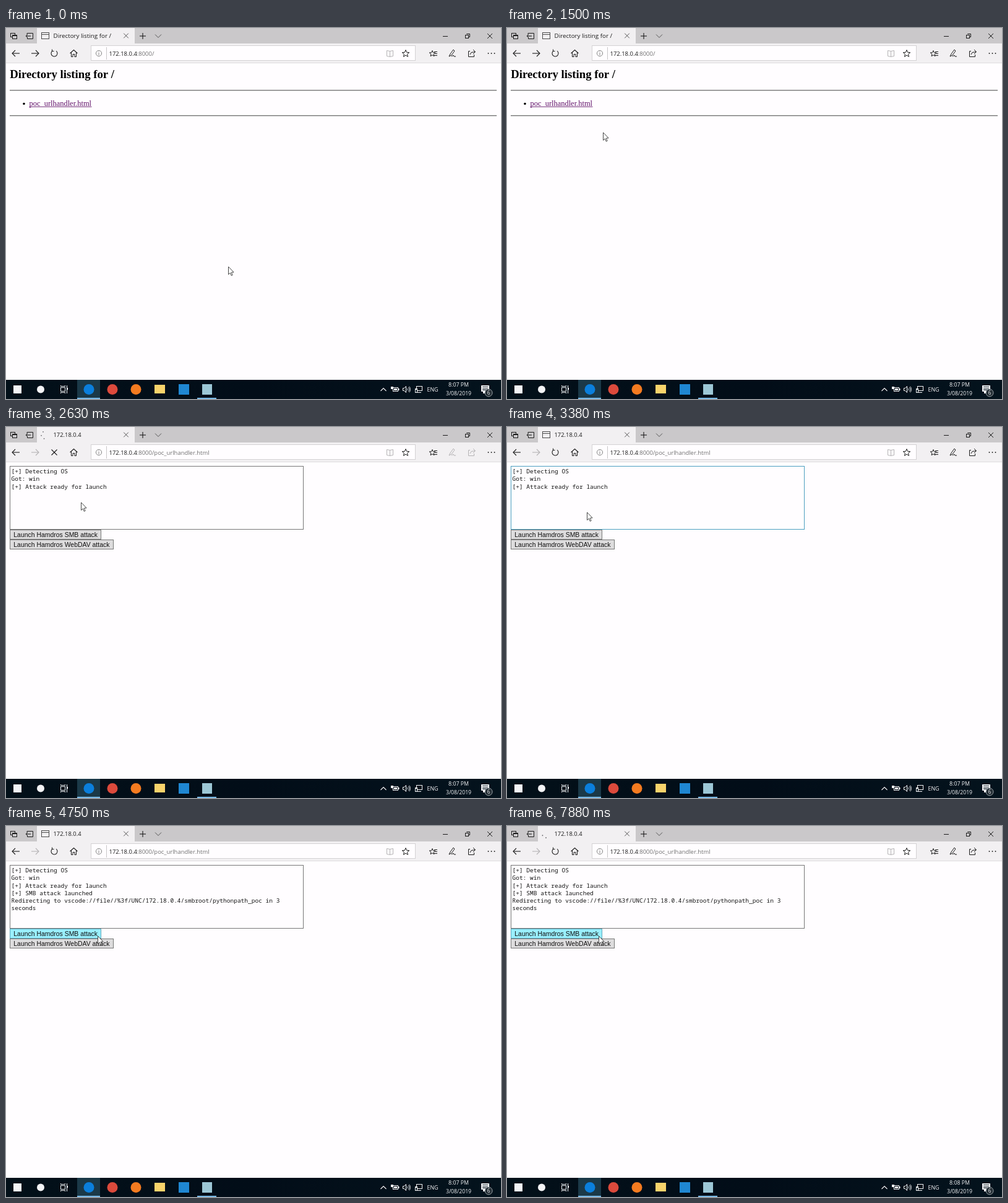
These frames come from a looping animation (800x600 px, 8000 ms). An HTML page with a canvas:

```html
<!DOCTYPE html>
<html lang="en">
<head>
<meta charset="utf-8">
<title>Browser demo</title>
<style>
html, body { margin: 0; width: 100%; height: 100%; overflow: hidden; background: #fffdff; }
canvas { display: block; }
</style>
</head>
<body>
<canvas id="stage" width="800" height="600"></canvas>
<script>
const ctx = document.getElementById('stage').getContext('2d');
const LOOP = 8000, TICK = 125;
const INK = '#1c1c1c', FADED = '#b4b2b4', WHITE = '#f4f4f6';
const UI = '"Open Sans", sans-serif';
const SERIF = '"Liberation Serif", serif';
const SANS = '"Liberation Sans", sans-serif';
const MONO = '"Noto Sans Mono", monospace';

// Times of the events on the screen, in ms.
const LINK_HOVER = 1875, LOAD_START = 2250, PAGE_SHOWN = 2625, LOAD_END = 2875;
const MOVE_IN_BOX = 3250, PRESS = 4625, LAUNCH = 4750, MINUTE = 7250, REDIRECT = 7750;

const linear = p => p;
const smooth = p => p * p * (3 - 2 * p);
const MOVES = [
  { from: 625, to: 1500, a: [359, 386], b: [155, 169], ease: smooth },
  { from: 1500, to: 2000, a: [155, 169], b: [121, 122], ease: linear },
  { from: 3125, to: 4000, a: [121, 122], b: [148, 178], ease: linear }
];

function pointerAt(t) {
  let pos = MOVES[0].a;
  for (const m of MOVES) {
    if (t < m.from) break;
    const p = m.ease(Math.min(1, (t - m.from) / (m.to - m.from)));
    pos = m.a.map((v, i) => Math.round(v + (m.b[i] - v) * p));
  }
  return pos;
}

function box(x, y, w, h, color) {
  ctx.fillStyle = color;
  ctx.fillRect(x, y, w, h);
}

function frame(x, y, w, h, color, width = 1) {
  ctx.strokeStyle = color;
  ctx.lineWidth = width;
  ctx.strokeRect(x + 0.5, y + 0.5, w - 1, h - 1);
}

function path(points, color, width = 1, closed = false) {
  ctx.beginPath();
  for (let i = 0; i < points.length; i += 2) ctx.lineTo(points[i], points[i + 1]);
  if (closed) ctx.closePath();
  ctx.strokeStyle = color;
  ctx.lineWidth = width;
  ctx.stroke();
}

function disc(x, y, r, color) {
  ctx.beginPath();
  ctx.arc(x, y, r, 0, Math.PI * 2);
  ctx.fillStyle = color;
  ctx.fill();
}

function arc(x, y, r, color, start = 0, end = Math.PI * 2, width = 1) {
  ctx.beginPath();
  ctx.arc(x, y, r, start, end);
  ctx.strokeStyle = color;
  ctx.lineWidth = width;
  ctx.stroke();
}

function text(str, x, y, size, family, color, align = 'left', weight = '') {
  ctx.font = `${weight} ${size}px ${family}`;
  ctx.textAlign = align;
  ctx.fillStyle = color;
  ctx.fillText(str, x, y);
  return ctx.measureText(str).width;
}

function cross(x, y, r, color, width = 1) {
  path([x - r, y - r, x + r, y + r], color, width);
  path([x - r, y + r, x + r, y - r], color, width);
}

function arrow(x, y, dir, color) {
  path([x - 6, y, x + 6, y], color, 1.1);
  const tip = x + 6 * dir, tail = x + dir;
  path([tail, y - 5, tip, y, tail, y + 5], color, 1.1);
}

function star(x, y, r, color) {
  const points = [];
  for (let i = 0; i < 10; i++) {
    const a = -Math.PI / 2 + i * Math.PI / 5, d = i % 2 ? r * 0.45 : r;
    points.push(x + d * Math.cos(a), y + d * Math.sin(a));
  }
  path(points, color, 1, true);
}

function spinner(elapsed) {
  for (let i = 0; i < 5; i++) {
    const age = elapsed - i * 170;
    if (age < 0) break;
    const a = (90 + age * 0.4) * Math.PI / 180;
    disc(63 + 6 * Math.cos(a), 13 + 6 * Math.sin(a), 0.9, '#66666a');
  }
}

function drawTabs(title, titleSize, spin) {
  box(0, 0, 800, 25, '#cac8ca');
  box(50, 0, 158, 25, '#f2f0f2');

  frame(7, 8, 8, 7, INK);
  box(10, 11, 8, 7, '#cac8ca');
  frame(10, 11, 8, 7, INK);
  box(10, 11, 8, 2, INK);
  path([34, 10.5, 34, 8.5, 43.5, 8.5, 43.5, 17.5, 34.5, 17.5, 34.5, 15], INK);
  path([40, 13, 32, 13], INK);
  path([35, 10.5, 32, 13, 35, 15.5], INK);

  if (spin >= 0) spinner(spin);
  else {
    frame(57, 7, 13, 11, '#4b4b4b');
    path([57, 10.5, 70, 10.5], '#4b4b4b');
  }
  text(title, 76.5, 16, titleSize, UI, INK);
  cross(194, 12.5, 3.8, '#555');
  path([216, 13, 226, 13], INK, 1.1);
  path([221, 8, 221, 18], INK, 1.1);
  path([241, 10.5, 246, 15.5, 251, 10.5], '#555');

  path([706, 13.5, 714, 13.5], INK);
  frame(742, 11, 6, 6, INK);
  path([744.5, 10, 744.5, 9.5, 749.5, 9.5, 749.5, 14.5, 748, 14.5], INK);
  cross(782, 13, 4, INK);
}

function drawToolbar(address, loading, stop, canForward) {
  box(0, 25, 800, 31, '#f2f0f2');
  box(0, 56, 800, 1, '#dedcde');
  arrow(16, 41, -1, INK);
  arrow(47, 41, 1, canForward ? INK : FADED);
  if (stop) cross(78, 41, 4.5, INK, 1.1);
  else {
    arc(78, 41, 5, INK, -0.9, 4.1, 1.1);
    path([74.5, 34.5, 74.5, 37.5, 77.5, 37.5], INK);
  }
  path([103.5, 41, 109.5, 35.5, 115.5, 41], INK, 1.1);
  path([105.5, 40, 105.5, 46.5, 108, 46.5, 108, 42.5, 111, 42.5, 111, 46.5, 113.5, 46.5, 113.5, 40], INK);

  box(138, 29, 524, 24, '#fffdff');
  frame(137, 28, 525, 25, '#d4d2d4');
  arc(150, 41, 4.6, '#858585');
  box(149.5, 40, 1, 4, '#858585');
  box(149.5, 38, 1, 1, '#858585');
  box(162, 31, 1, 20, '#c8c6c8');
  const host = text('172.18.0.4', 166.5, 44.5, 9.45, UI, INK);
  text(address, 166.5 + host, 44.5, 9.45, UI, '#707070');

  path([620.5, 37.5, 615.5, 36.5, 615.5, 45.5, 620.5, 46.5, 625.5, 45.5, 625.5, 36.5, 620.5, 37.5, 620.5, 46.5], FADED);
  star(646, 41.5, 6, INK);
  star(689, 41.5, 5, INK);
  for (let i = 0; i < 3; i++) path([692 + i % 2, 38.5 + i * 3, 697, 38.5 + i * 3], INK);

  const tool = loading ? FADED : INK;
  path([716, 46, 718, 42, 723, 35, 725, 37, 720, 44, 716, 46], tool);
  path([720, 46, 723, 44, 724, 46, 727, 46], tool);
  path([750, 37.5, 747.5, 37.5, 747.5, 46.5, 756.5, 46.5, 756.5, 43], tool);
  path([750, 43, 752, 39.5, 758, 38.5], tool);
  path([755, 35, 758.5, 38.5, 755, 42], tool);
  for (const x of [779.5, 784.5, 789.5]) disc(x, 41, 0.9, INK);
}

function drawListing(hovered) {
  text('Directory listing for /', 6.2, 81, 18.75, SERIF, '#000', 'left', 'bold');
  box(6, 100, 787, 1.4, '#777');
  box(6, 141, 787, 1.4, '#777');
  disc(29, 122.5, 1.8, '#000');
  text('poc_urlhandler.html', 37.5, 126, 12.45, SERIF, '#62126a');
  box(37.5, 127, 101, 1, '#7a397f');
  if (hovered) {
    box(2, 548, 183, 19, '#f4f2f4');
    frame(2, 548, 183, 19, '#c0bec0');
    text('http://172.18.0.4:8000/poc_urlhandler.html', 5.5, 561, 8.8, UI, INK);
  }
}

function drawButton(label, y, width, fill, edge) {
  box(6, y, width, 16, fill);
  frame(6, y, width, 16, edge);
  text(label, 12.3, y + 11.8, 10.45, SANS, '#111');
}

function drawAttackPage(t, [, py]) {
  const inBox = t >= MOVE_IN_BOX && py < 165;
  frame(6, 63, 475, 103, inBox ? '#4b9fc0' : '#777');
  const lines = ['[+] Detecting OS', 'Got: win', '[+] Attack ready for launch'];
  if (t >= LAUNCH) lines.push(
    '[+] SMB attack launched',
    'Redirecting to vscode://file//%3f/UNC/172.18.0.4/smbroot/pythonpath_poc in 3',
    'seconds');
  lines.forEach((s, i) => text(s, 8.5, 75.2 + i * 12.2, 9.53, MONO, '#161616'));

  const over = py >= 165, pressed = t >= PRESS && t < LAUNCH;
  const fill = pressed ? '#66d4ee' : over ? '#99effd' : '#dddcdd';
  drawButton('Launch Hamdros SMB attack', 166, 148, fill, over ? '#5ca9bd' : '#777');
  drawButton('Launch Hamdros WebDAV attack', 182, 168, '#dddcdd', '#777');
}

function drawTaskbar(clock) {
  const shade = ctx.createLinearGradient(0, 0, 800, 0);
  shade.addColorStop(0, '#031019');
  shade.addColorStop(0.5, '#020d18');
  shade.addColorStop(1, '#04131d');
  box(0, 569, 800, 31, shade);
  box(115, 569, 37, 31, '#1b3948');
  box(115, 598, 37, 2, '#79b9e6');
  box(309, 598, 31, 2, '#79b9e6');

  box(12, 578, 13, 13, WHITE);
  disc(56, 584.5, 6, WHITE);
  frame(88, 581, 8, 7, WHITE);
  path([88.5, 578, 88.5, 579.5, 95.5, 579.5, 95.5, 578], WHITE);
  path([88.5, 591, 88.5, 589.5, 95.5, 589.5, 95.5, 591], WHITE);
  path([98.5, 578, 98.5, 591], WHITE);
  box(98, 582, 2, 3, WHITE);

  disc(134, 584.5, 8.5, '#0b7fdc');
  disc(172, 584.5, 8.5, '#dc4a3c');
  disc(210, 584.5, 8.5, '#f47b20');
  box(240, 577, 17, 14, '#f8d36b');
  box(279, 576, 17, 17, '#1f87d2');
  box(317, 576, 16, 17, '#9cc7d6');

  path([605.5, 587, 610, 582.5, 614.5, 587], WHITE, 1.1);
  frame(625, 581, 9, 7, WHITE);
  box(627, 583, 5, 3, WHITE);
  box(634, 583, 1.5, 3, WHITE);
  box(622, 580, 4, 4, WHITE);
  path([641.5, 582.5, 643.5, 582.5, 646.5, 579.5, 646.5, 589.5, 643.5, 586.5, 641.5, 586.5], WHITE, 1, true);
  for (const r of [2.5, 5, 7]) arc(646.5, 584.5, r, WHITE, -0.75, 0.75, 0.9);
  frame(663, 579, 10, 8, WHITE);
  path([665, 589.5, 671, 589.5], WHITE);
  box(661, 583, 4, 7, WHITE);
  box(662, 585, 2, 4, '#04131d');

  text('ENG', 689.5, 587.5, 8.8, UI, WHITE, 'center');
  text(clock, 731.5, 580, 8.8, UI, WHITE, 'center');
  text('3/08/2019', 731.5, 594, 8.7, UI, WHITE, 'center');

  box(768, 578, 13, 10, WHITE);
  box(771, 587, 4, 4, WHITE);
  for (const y of [580, 583, 585]) box(770, y, 9, 1, '#17252e');
  disc(780, 590, 6, '#252f36');
  arc(780, 590, 6, '#aab0b5', 0, Math.PI * 2, 0.9);
  text('6', 780, 593, 8.2, UI, WHITE, 'center');
}

function drawPointer([x, y]) {
  ctx.save();
  ctx.translate(x + 0.5, y);
  ctx.beginPath();
  for (const [px, py] of [[0, 0], [0, 12.6], [2.9, 10], [4.7, 14.4], [6.6, 13.6], [4.8, 9.2], [8.6, 9]]) ctx.lineTo(px, py);
  ctx.closePath();
  ctx.fillStyle = '#fff';
  ctx.fill();
  ctx.strokeStyle = '#333';
  ctx.lineWidth = 0.9;
  ctx.stroke();
  ctx.restore();
}

function draw(now) {
  const t = Math.floor((now % LOOP) / TICK) * TICK;
  const pointer = pointerAt(t);
  const newPage = t >= PAGE_SHOWN;
  const loading = t >= LOAD_START && t < LOAD_END;
  const spin = loading ? t - LOAD_START : t >= REDIRECT ? t - REDIRECT + 45 : -1;
  const stop = loading || t === REDIRECT;

  box(0, 0, 800, 600, '#fffdff');
  drawTabs(newPage ? '172.18.0.4' : 'Directory listing for /', newPage ? 9.4 : 9.84, spin);
  drawToolbar(newPage ? ':8000/poc_urlhandler.html' : ':8000/', loading, stop, !newPage);
  if (newPage) drawAttackPage(t, pointer);
  else drawListing(t >= LINK_HOVER);
  drawTaskbar(t >= MINUTE ? '8:08 PM' : '8:07 PM');
  drawPointer(pointer);
}

const start = performance.now();
function tick() {
  draw(performance.now() - start);
  requestAnimationFrame(tick);
}
tick();
</script>
</body>
</html>
```
